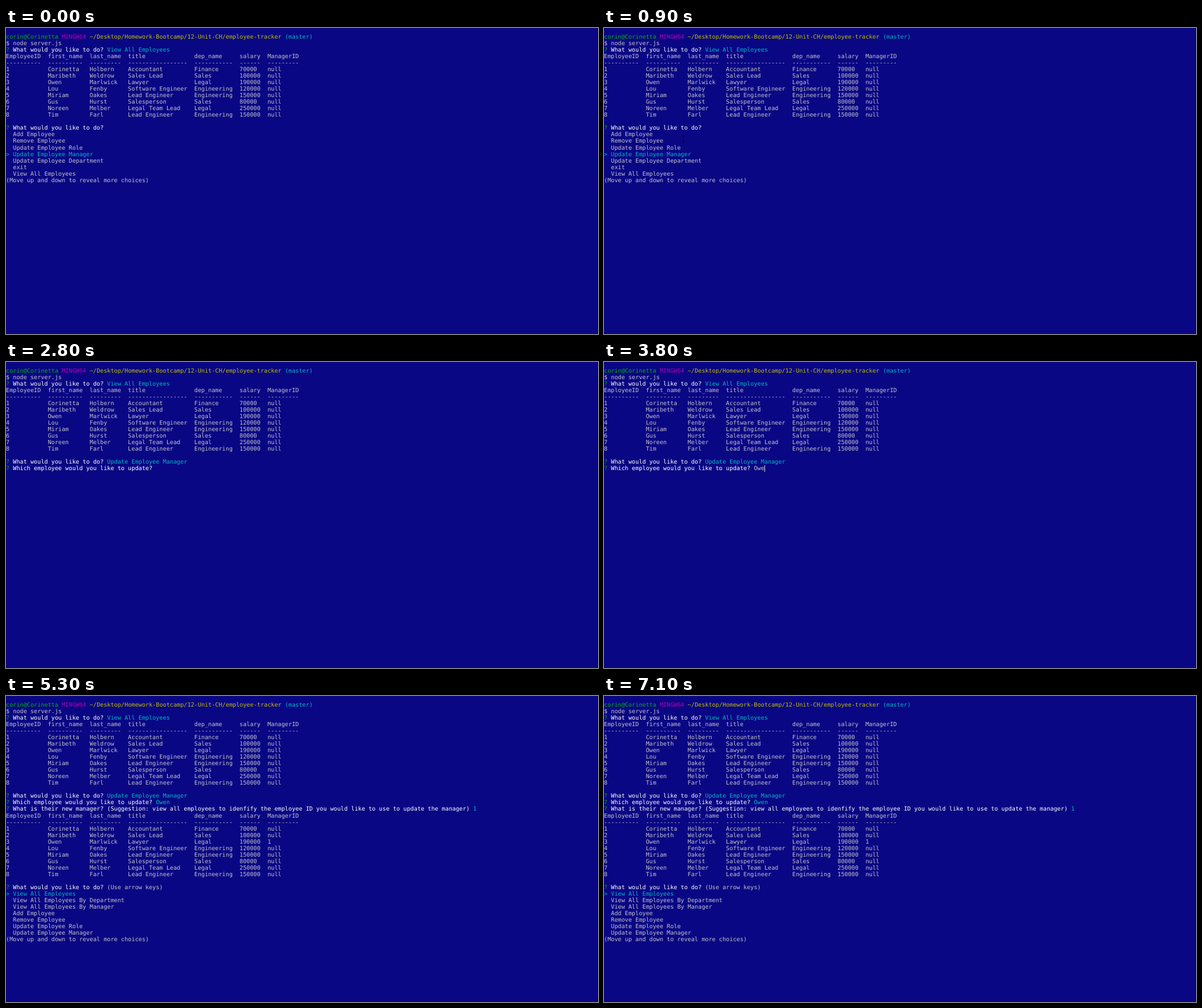
Animation of 1000x518 px, one loop 7200 ms. Source, as an HTML page:

```html
<!DOCTYPE html>
<html lang="en">
<head>
<meta charset="utf-8">
<title>Employee tracker terminal</title>
<style>
  html, body { margin: 0; width: 100%; height: 100%; overflow: hidden; background: #0a0784; }
  #stage { position: relative; width: 1000px; height: 518px; overflow: hidden; background: #0a0784; }
  #edge { position: absolute; right: 0; top: 0; width: 1px; height: 100%; background: #05044a; }
  .row {
    position: absolute; left: 0; height: 11.03px; line-height: 11.03px; white-space: pre;
    font-family: "DejaVu Sans Mono", "Liberation Mono", monospace;
    font-size: 9.79px; text-rendering: geometricPrecision; font-variant-ligatures: none;
  }
  .n { color: #c3c3cb; }
  .w { color: #fff; }
  .g { color: #00b400; }
  .m { color: #b400b4; }
  .y { color: #bfbf00; }
  .c { color: #00b9c4; }
  #caret { position: absolute; width: 1px; height: 11px; background: #d8d8e0; }
  #mouse { position: absolute; left: 0; top: 0; width: 7px; height: 12px; }
</style>
</head>
<body>
<div id="stage">
  <div id="text"></div>
  <div id="caret"></div>
  <svg id="mouse" viewBox="0 0 7 12"><path d="M1.5 .5h1.5l.5 .5l.5 -.5h1.5M3.5 1v10M1.5 11.5h1.5l.5 -.5l.5 .5h1.5" fill="none" stroke="#02022c"/></svg>
  <div id="edge"></div>
</div>
<script>
const LOOP = 7200, STEP = 100, CELL = 5.894, LINE = 11.03, TOP = 10;
const $ = id => document.getElementById(id);

// Moments of the session, in ms
const PICK = 2300, KEYS = [3300, 3500, 3800, 3900], NAMED = 4100, DIGIT = 5000, SAVED = 5300;
const CARET_ON = [[PICK, 2800], [3300, 4500], [4900, SAVED]];
const MOUSE = [[700, 134, 188], [900, 134, 188], [1400, 150, 206], [1900, 156, 213], [PICK, 156, 213]];

const NAME = "Owen";
const WIDTHS = [10, 10, 9, 17, 11, 6, 9];
const HEAD = "EmployeeID,first_name,last_name,title,dep_name,salary,ManagerID";
const STAFF = [
  "Corinetta,Holbern,Accountant,Finance,70000",
  "Maribeth,Weldrow,Sales Lead,Sales,100000",
  NAME + ",Marlwick,Lawyer,Legal,190000",
  "Lou,Fenby,Software Engineer,Engineering,120000",
  "Miriam,Oakes,Lead Engineer,Engineering,150000",
  "Gus,Hurst,Salesperson,Sales,80000",
  "Noreen,Melber,Legal Team Lead,Legal,250000",
  "Tim,Farl,Lead Engineer,Engineering,150000"
];
const MENU = ["View All Employees", "View All Employees By Department", "View All Employees By Manager",
  "Add Employee", "Remove Employee", "Update Employee Role", "Update Employee Manager",
  "Update Employee Department", "exit"];

// "^x" switches to colour class x
const ask = (question, rest = "") => `^g? ^w${question} ${rest}`;
const cells = list => "^n" + list.map((s, i) => s.padEnd(WIDTHS[i])).join("  ");
const table = manager => [
  cells(HEAD.split(",")),
  cells(WIDTHS.map(n => "-".repeat(n))),
  ...STAFF.map((s, i) => cells([`${i + 1}`, ...s.split(","), i === 2 ? manager : "null"])),
  ""
];
const menu = (first, chosen) => {
  const rows = Array.from({ length: 7 }, (_, i) => {
    const k = (first + i) % MENU.length;
    return (k === chosen ? "^c> " : "^n  ") + MENU[k];
  });
  return [...rows, "^n(Move up and down to reveal more choices)"];
};

const TODO = "What would you like to do?";
const WHICH = "Which employee would you like to update?";
const NEW_BOSS = "What is their new manager? (Suggestion: view all employees to idenfify " +
  "the employee ID you would like to use to update the manager)";
const INTRO = [
  "^gcorin@Corinetta ^mMINGW64 ^y~/Desktop/Homework-Bootcamp/12-Unit-CH/employee-tracker ^c(master)",
  "^n$ node server.js",
  ask(TODO, "^cView All Employees"),
  ...table("null")
];

function screen(t) {
  if (t < PICK) return [...INTRO, ask(TODO), ...menu(3, 6)];
  const rows = [...INTRO, ask(TODO, "^cUpdate Employee Manager")];
  if (t < NAMED) {
    const typed = KEYS.filter(k => t >= k).length;
    return [...rows, ask(WHICH, "^n" + NAME.slice(0, typed))];
  }
  rows.push(ask(WHICH, "^c" + NAME));
  if (t < SAVED) return [...rows, ask(NEW_BOSS, t >= DIGIT ? "^n1" : "")];
  return [...rows, ask(NEW_BOSS, "^c1"), ...table("1"),
    ask(TODO, "^n(Use arrow keys)"), ...menu(0, 0)];
}

function paint(rows) {
  $("text").replaceChildren(...rows.map((row, i) => {
    const line = document.createElement("div");
    line.className = "row";
    line.style.top = TOP + i * LINE + "px";
    for (const part of row.split("^").slice(1)) {
      const span = document.createElement("span");
      span.className = part[0];
      span.textContent = part.slice(1);
      line.append(span);
    }
    return line;
  }));
}

function placeCaret(t, rows) {
  const on = CARET_ON.some(([a, b]) => t >= a && t < b);
  const last = rows.length - 1;
  const column = rows[last].replace(/\^./g, "").length;
  $("caret").style.display = on ? "" : "none";
  $("caret").style.left = Math.round(column * CELL) + "px";
  $("caret").style.top = Math.round(TOP + last * LINE) + "px";
}

function placeMouse(t) {
  const next = MOUSE.findIndex(p => p[0] > t);
  $("mouse").style.display = next > 0 ? "" : "none";
  if (next < 1) return;
  const [t0, x0, y0] = MOUSE[next - 1], [t1, x1, y1] = MOUSE[next];
  const k = (t - t0) / (t1 - t0);
  const x = Math.round(x0 + (x1 - x0) * k) - 3, y = Math.round(y0 + (y1 - y0) * k) - 6;
  $("mouse").style.transform = `translate(${x}px, ${y}px)`;
}

let shown = -1, shownText = "";
function frame() {
  const t = Math.floor(performance.now() % LOOP / STEP) * STEP;
  if (t !== shown) {
    shown = t;
    const rows = screen(t), text = rows.join("\n");
    if (text !== shownText) paint(rows);
    shownText = text;
    placeCaret(t, rows);
    placeMouse(t);
  }
  requestAnimationFrame(frame);
}
frame();
</script>
</body>
</html>
```
